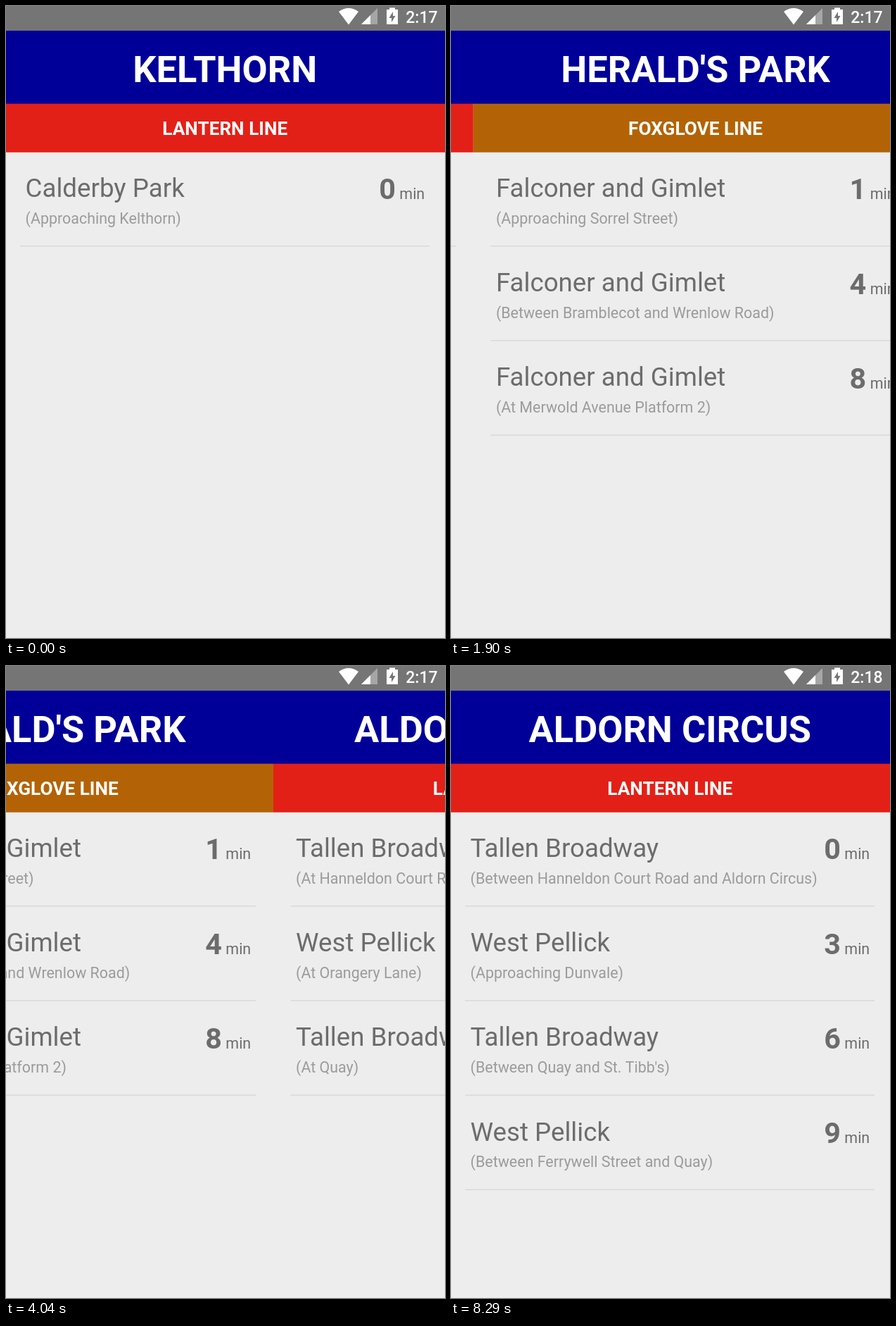
An HTML page with a canvas for the animation above (9.85 s loop, 624 px wide and 897 px high).

```html
<!DOCTYPE html>
<html lang="en">
<head>
<meta charset="utf-8">
<title>Train arrivals</title>
<style>
  html, body { margin: 0; width: 100%; height: 100%; overflow: hidden; background: #ededed; }
  canvas { display: block; }
</style>
</head>
<body>
<canvas id="stage" width="624" height="897"></canvas>
<script>
const ctx = document.getElementById('stage').getContext('2d');
const LOOP = 9850;
const PAGE_LEFT = -4.5, PAGE_WIDTH = 631.5, CENTER = 311.25, ROW_HEIGHT = 134.2;
const RED = '#e32017', BROWN = '#b36305', GREY = '#6c6c6c', PALE = '#9b9b9b';

const pages = [
  { title: 'KELTHORN', line: 'LANTERN LINE', color: RED, rows: [
    ['Calderby Park', 'Approaching Kelthorn', 0]] },
  { title: "HERALD'S PARK", line: 'FOXGLOVE LINE', color: BROWN, rows: [
    ['Falconer and Gimlet', 'Approaching Sorrel Street', 1],
    ['Falconer and Gimlet', 'Between Bramblecot and Wrenlow Road', 4],
    ['Falconer and Gimlet', 'At Merwold Avenue Platform 2', 8]] },
  { title: 'ALDORN CIRCUS', line: 'LANTERN LINE', color: RED, rows: [
    ['Tallen Broadway', 'At Hanneldon Court Road', 1],
    ['West Pellick', 'At Orangery Lane', 4],
    ['Tallen Broadway', 'At Quay', 8]] },
];
const refreshedRows = [
  ['Tallen Broadway', 'Between Hanneldon Court Road and Aldorn Circus', 0],
  ['West Pellick', 'Approaching Dunvale', 3],
  ['Tallen Broadway', "Between Quay and St. Tibb's", 6],
  ['West Pellick', 'Between Ferrywell Street and Quay', 9],
];

// The screen updates in ticks; returns how many have passed since start (0 = none).
const ticks = (time, start) => Math.max(0, Math.floor((time - start + 14) / 117.3) + 1);

// Slow start, fast middle, long settle; a larger push moves the middle earlier.
function swipe(time, start, push) {
  const x = Math.min(1, ticks(time, start) / 12);
  const a = push * x ** 2.5;
  return a / (a + (1 - x) ** 2.5);
}

// Interpolates points of the form [step, x, y].
function along(points, step) {
  const i = Math.max(1, points.findIndex(p => p[0] >= step));
  const [a, b] = [points[i - 1], points[i]];
  const f = (step - a[0]) / (b[0] - a[0]);
  return [a[1] + (b[1] - a[1]) * f, a[2] + (b[2] - a[2]) * f];
}

function rect(x, y, w, h, color) {
  ctx.fillStyle = color;
  ctx.fillRect(x, y, w, h);
}

function text(str, x, y, size, color, { weight = 400, align = 'left' } = {}) {
  ctx.font = `${weight} ${size}px Roboto, sans-serif`;
  ctx.textAlign = align;
  ctx.fillStyle = color;
  ctx.fillText(str, x, y);
}

function polygon(color, ...points) {
  ctx.fillStyle = color;
  ctx.beginPath();
  points.forEach(([x, y]) => ctx.lineTo(x, y));
  ctx.closePath();
  ctx.fill();
}

function drawRow([name, place, minutes], index) {
  const y = index * ROW_HEIGHT;
  text(name, 27.6, 271 + y, 36.7, GREY);
  text(`(${place})`, 27.6, 308.6 + y, 21.45, PALE);
  text(minutes, 554, 274.4 + y, 41.3, GREY, { weight: 700, align: 'right' });
  text('min', 595.2, 274.4 + y, 21.45, GREY, { align: 'right' });
  rect(20, 340 + y, 582, 1.4, '#d8d8d8');
}

function drawPage(page, rows, x) {
  ctx.save();
  ctx.translate(x, 0);
  rect(PAGE_LEFT, 138.7, PAGE_WIDTH, 69, page.color);
  const heading = { weight: 700, align: 'center' };
  text(page.title, CENTER, 108, 52.4, '#fff', heading);
  text(page.line, CENTER, 183.2, 26.2, '#fff', heading);
  rows.forEach(drawRow);
  ctx.restore();
}

function drawStatusBar(time) {
  rect(0, 0, 624, 35, '#757575');
  ctx.fillStyle = '#fff';
  ctx.beginPath();
  ctx.moveTo(487, 26.5);
  ctx.lineTo(473, 8);
  ctx.quadraticCurveTo(487, -2, 501, 8);
  ctx.fill();
  polygon('#a6a6a6', [505, 26], [528, 26], [528, 3]);
  polygon('#fff', [505, 26], [518, 26], [518, 13]);
  rect(541, 5, 16, 21, '#fff');
  rect(545, 2.5, 8, 3, '#fff');
  polygon('#757575', [550, 8], [544.5, 17], [548, 17], [548, 23], [553.5, 14], [550, 14]);
  text(time < 8290 ? '2:17' : '2:18', 568.3, 24, 23, '#fff', { weight: 500 });
}

function drawSpinner(step) {
  if (step < 4 || step > 15) return;
  const y = 174 + 122 * Math.min(1, (step - 3) / 6);
  const scale = step < 14 ? 1 : step === 14 ? 0.6 : 0.25;
  ctx.save();
  ctx.beginPath();
  ctx.rect(0, 207, 624, 690);
  ctx.clip();
  ctx.translate(311, y);
  ctx.scale(scale, scale);
  ctx.shadowColor = 'rgba(0,0,0,.28)';
  ctx.shadowBlur = 5;
  ctx.shadowOffsetY = 2;
  ctx.fillStyle = '#fafafa';
  ctx.beginPath();
  ctx.arc(0, 0, 33, 0, 2 * Math.PI);
  ctx.fill();
  ctx.shadowColor = 'transparent';
  const start = (150 + (step - 12) * 15) * Math.PI / 180;
  const sweep = Math.min(305, (step - 3) * 50) * Math.PI / 180;
  ctx.strokeStyle = '#000';
  ctx.lineWidth = 4;
  ctx.beginPath();
  ctx.arc(0, 0, 15, start, start + sweep);
  ctx.stroke();
  ctx.restore();
}

const cursorPath = [[1, 557, 72], [4, 330, 300], [9, 291, 738], [12, 289, 753], [14, 289, 792]];

function drawCursor(step) {
  if (step < 1 || step > 14) return;
  ctx.save();
  ctx.translate(...along(cursorPath, step));
  polygon('#000', [0.5, 0.5], [0.5, 14], [3.5, 11.2], [5.6, 16], [8, 15], [6, 10.3], [10, 10]);
  ctx.strokeStyle = '#fff';
  ctx.lineWidth = 1;
  ctx.stroke();
  ctx.restore();
}

function draw(time) {
  const position = swipe(time, 1080, 2.9) + swipe(time, 3570, 1.49);
  const pull = ticks(time, 5700);
  rect(0, 0, 624, 897, '#ededed');
  rect(0, 35, 624, 104, '#000099');
  pages.forEach((page, i) => {
    const rows = i === 2 && pull >= 14 ? refreshedRows : page.rows;
    const x = (i - position) * PAGE_WIDTH;
    if (Math.abs(x) < PAGE_WIDTH) drawPage(page, rows, x);
  });
  drawSpinner(pull);
  drawCursor(pull);
  drawStatusBar(time);
}

function tick() {
  draw(performance.now() % LOOP);
  requestAnimationFrame(tick);
}
tick();
</script>
</body>
</html>
```
